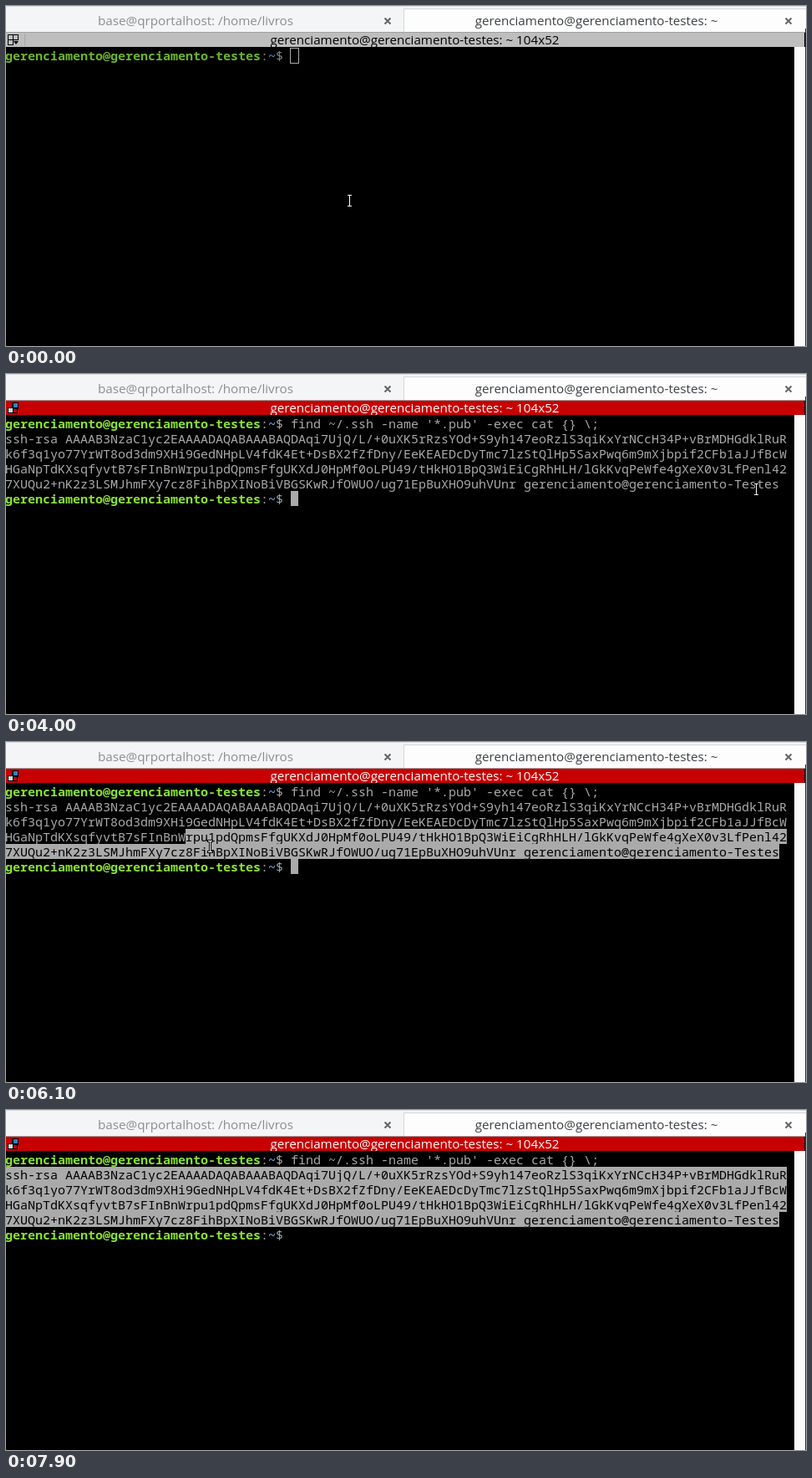
An HTML page with a canvas that plays this animation: 958 px wide and 407 px high, repeating every 8000 ms.

```html
<!DOCTYPE html>
<html>
<head>
<meta charset="utf-8">
<style>
html, body { margin: 0; width: 100%; height: 100%; overflow: hidden; background: #000; }
canvas { display: block; }
</style>
</head>
<body>
<canvas id="stage" width="958" height="407"></canvas>
<script>
const ctx = document.getElementById('stage').getContext('2d');
const LOOP = 8000, STEP = 100, CELL = 9, LINE = 18, TOP = 50, LEFT = -1;
const FOCUS = 900, PASTE = 1100, RUN = 2400, DRAG = 5400;
const MONO = '15px "Noto Sans Mono", "DejaVu Sans Mono", monospace';
const SANS = '15.2px "Open Sans", "Noto Sans", sans-serif';
const GRAY = '#aaaaaa';

const user = 'gerenciamento';
const login = user + '@' + user + '-testes';
const command = "find ~/.ssh -name '*.pub' -exec cat {} \\;";
const output = [
  'ssh-rsa AAAAB3NzaC1yc2EAAAADAQABAAABAQDAqi7UjQ/L/+0uXK5rRzsYOd+S9yh147eoRzlS3qiKxYrNCcH34P+vBrMDHGdklRuR',
  'k6f3q1yo77YrWT8od3dm9XHi9GedNHpLV4fdK4Et+DsBX2fZfDny/EeKEAEDcDyTmc7lzStQlHp5SaxPwq6m9mXjbpif2CFb1aJJfBcW',
  'HGaNpTdKXsqfyvtB7sFInBnWrpu1pdQpmsFfgUKXdJ0HpMf0oLPU49/tHkHO1BpQ3WiEiCgRhHLH/lGkKvqPeWfe4gXeX0v3LfPenl42',
  '7XUQu2+nK2z3LSMJhmFXy7cz8FihBpXINoBiVBGSKwRJfOWUO/ug71EpBuXHO9uhVUnr ' + user + '@' + user + '-Testes'
];
const promptEnd = login.length + 4;
const lastRow = output.length;

// Pointer stops; each is reached with a linear or slowing move
const linear = k => k;
const slowing = k => 1 - (1 - k) ** 2;
const stops = [
  { t: 2700, x: 411, y: 233 },
  { t: 3000, x: 472, y: 209, ease: linear },
  { t: 3400, x: 713, y: 158, ease: linear },
  { t: 4400, x: 933, y: 134, ease: slowing },
  { t: 5300, x: 916, y: 132, ease: linear },
  { t: 6200, x: 160, y: 124, ease: linear },
  { t: 7300, x: 17, y: 79, ease: slowing },
  { t: 7900, x: -12, y: 78, ease: linear }
];

function pointerAt(t) {
  const i = stops.findIndex(s => t <= s.t);
  if (i === 0) return stops[0];
  if (i < 0) return stops[stops.length - 1];
  const a = stops[i - 1], b = stops[i];
  const k = b.ease((t - a.t) / (b.t - a.t));
  return { x: a.x + (b.x - a.x) * k, y: a.y + (b.y - a.y) * k };
}

function rect(color, x, y, w, h) {
  ctx.fillStyle = color;
  ctx.fillRect(x, y, w, h);
}

function label(text, x, y, color) {
  ctx.font = SANS;
  ctx.textAlign = 'center';
  ctx.fillStyle = color;
  ctx.fillText(text, x, y);
}

function put(text, col, row, color, weight = '') {
  ctx.font = weight + ' ' + MONO;
  ctx.textAlign = 'left';
  ctx.fillStyle = color;
  [...text].forEach((ch, i) =>
    ctx.fillText(ch, LEFT + (col + i) * CELL, TOP + row * LINE + 15));
}

function cross(x, y) {
  ctx.strokeStyle = '#646464';
  ctx.lineWidth = 2;
  ctx.beginPath();
  for (const s of [-1, 1]) {
    ctx.moveTo(x - 3.5, y - 3.5 * s);
    ctx.lineTo(x + 3.5, y + 3.5 * s);
  }
  ctx.stroke();
}

function paneIcon(focused) {
  if (focused) {
    rect('#000', 7, 34, 8, 8);
    rect('#000', 2, 40, 12, 7);
    rect('#2f83c5', 9, 35, 5, 5);
    rect('#d4d4d4', 3, 41, 5, 5);
    rect('#c80000', 9, 42, 4, 4);
    return;
  }
  ctx.strokeStyle = '#000';
  ctx.lineWidth = 1;
  ctx.strokeRect(2.5, 34.5, 12, 6);
  ctx.strokeRect(2.5, 34.5, 6, 12);
  ctx.fillStyle = '#000';
  ctx.beginPath();
  ctx.moveTo(9, 42);
  ctx.lineTo(15, 42);
  ctx.lineTo(12, 46);
  ctx.fill();
}

function frame(focused) {
  rect('#f4f5f6', 0, 0, 958, 32);
  rect('#dadbdc', 0, 0, 958, 1);
  rect('#d5d6d7', 476, 3, 482, 29);
  rect('#fdfdfd', 477, 4, 481, 28);
  rect('#a0a0a0', 0, 31, 957, 1);
  label('base@qrportalhost: /home/livros', 227, 23, '#8b8e8f');
  label(login + ': ~', 707, 23, '#3c4043');
  cross(457, 18);
  cross(937, 18);

  rect(focused ? '#c80000' : '#bebebe', 0, 32, 956, 17);
  if (!focused) rect('#a8a8a8', 22, 33, 1, 15);
  paneIcon(focused);
  label(login + ': ~ 104x52', 489.5, 46, focused ? '#fff' : '#000');

  rect('#000', 0, 49, 944, 358);
  rect('#fafafa', 944, 49, 13, 358);
  rect('#303030', 957, 27, 1, 380);
}

function prompt(row, focused) {
  const n = login.length;
  const plain = focused ? GRAY : '#888888';
  put(login, 0, row, focused ? '#8ae234' : '#6eb52a', 'bold');
  put(':', n, row, plain);
  put('~', n + 1, row, focused ? '#729fcf' : '#5b7fa6', 'bold');
  put('$', n + 2, row, plain);
}

// The selection runs slightly ahead of the drawn pointer
function selection(t) {
  const { x, y } = pointerAt(t + Math.min(40, t - DRAG));
  const col = Math.max(0, Math.ceil(x / CELL));
  const first = Math.floor((y - TOP - 4) / LINE);
  for (let row = first; row <= lastRow; row++) {
    const from = row === first ? col : 0;
    const text = output[row - 1].slice(from);
    rect(GRAY, LEFT + from * CELL, TOP + row * LINE, text.length * CELL, LINE);
    put(text, from, row, '#000');
  }
}

function caret(t) {
  const done = t >= RUN, typed = t >= PASTE && !done;
  const x = LEFT + (promptEnd + (typed ? command.length : 0)) * CELL;
  const y = TOP + (done ? (lastRow + 1) * LINE : 0);
  if (t < FOCUS) {
    ctx.strokeStyle = GRAY;
    ctx.lineWidth = 1;
    ctx.strokeRect(x - 0.5, y + 0.5, 10, 18);
    return;
  }
  const on = done ? Math.floor((t - RUN) / 587) % 2 === 0 : t < 1500 || t >= 2100;
  if (on) rect(GRAY, x, y, CELL, LINE);
}

function pointer(t) {
  const spot = pointerAt(t);
  const x = Math.round(spot.x), y = Math.round(spot.y);
  for (const [color, g] of [['#000', 1], ['#fff', 0]]) {
    rect(color, x - g, y - 7 - g, 1 + 2 * g, 14 + 2 * g);
    for (const end of [y - 7, y + 6]) rect(color, x - 2 - g, end - g, 5 + 2 * g, 1 + 2 * g);
  }
}

function draw(now) {
  const t = Math.floor(now % LOOP / STEP) * STEP;
  const focused = t >= FOCUS;
  frame(focused);
  prompt(0, focused);
  if (t >= PASTE) put(command, promptEnd, 0, GRAY);
  if (t >= RUN) {
    output.forEach((text, i) => put(text, 0, i + 1, GRAY));
    prompt(lastRow + 1, true);
  }
  if (t >= DRAG) selection(t);
  caret(t);
  // hidden after the key press until it moves again
  if (t < RUN || t > stops[0].t) pointer(t);
}

const start = performance.now();
function tick() {
  draw(performance.now() - start);
  requestAnimationFrame(tick);
}
tick();
</script>
</body>
</html>
```
